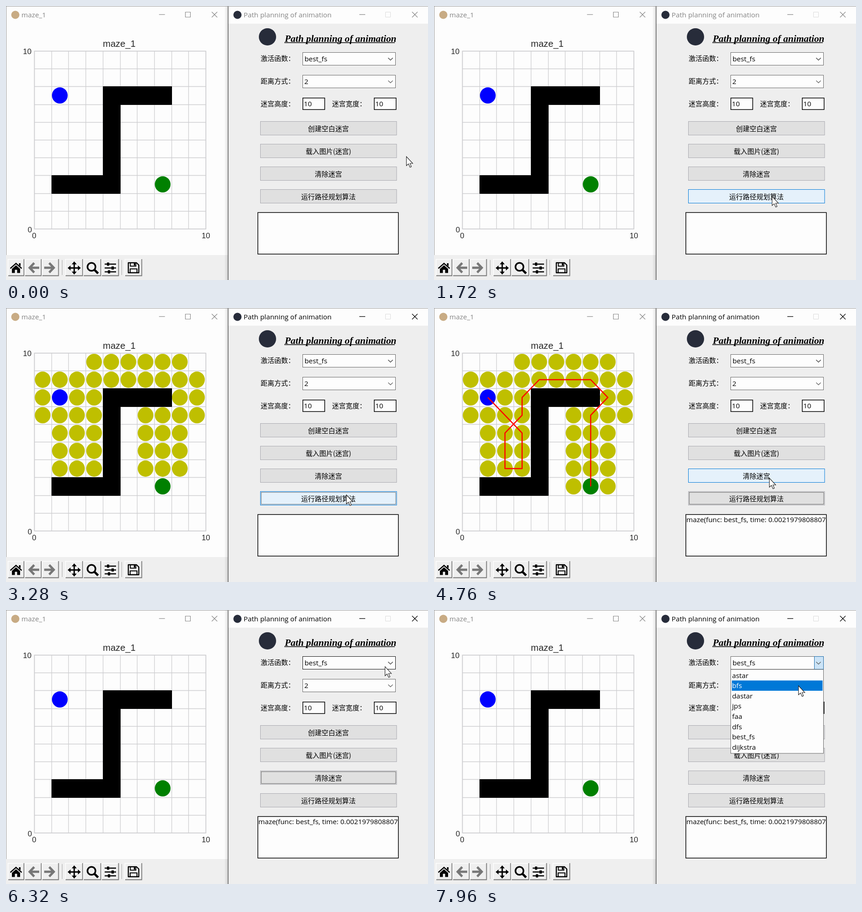
Animation of 928 by 604 pixels, one loop 8 s. Source, as an HTML page:

```html
<!DOCTYPE html>
<html lang="zh">
<head>
<meta charset="utf-8">
<title>Path planning</title>
<style>
html, body { margin: 0; width: 100%; height: 100%; overflow: hidden; background: #fdfdfd; }
svg { display: block; width: 100vw; height: 100vh; }
text { font: 15.3px "Open Sans", "Noto Sans", sans-serif; white-space: pre; }
.cjk { font: 15px "Noto Sans CJK SC", "Noto Sans CJK", sans-serif; }
.tick { font: 16.8px "Liberation Sans", sans-serif; fill: #262626; }
.plot-title { font: 20.2px "Liberation Sans", sans-serif; fill: #262626; }
.script { font: italic bold 21.4px "Liberation Serif", serif; }
.mid { text-anchor: middle; }
.end { text-anchor: end; }
.line { fill: none; }
.button { fill: #e0e0e0; stroke: #a9a9b0; }
.button.hover { fill: #e5f1fb; stroke: #0078d7; }
.focus { fill: none; stroke: #000; stroke-dasharray: 1 1; }
.combo { fill: #fdfdfd; stroke: #666; }
.combo.hover { stroke: #111; }
.entry { fill: #fdfdfd; stroke: #000; stroke-width: 1.5; }
</style>
</head>
<body>
<svg id="stage" viewBox="0 0 928 604" preserveAspectRatio="none"></svg>
<script>
const LOOP = 8000;
const RUN_CLICK = 1880, SEARCH_START = 1990, STEP = 70, RESULT = 3440;
const CLEAR_CLICK = 5200, LIST_OPEN = 6620;
const ROW_HEIGHT = 22.6, LIST_TOP = 132.8;

// Grid lines sit on whole pixels; disc centres do not.
const cellX = x => 62.5 + 37.7 * x;
const cellY = y => 491.5 - 39.2 * y;
const lineX = x => Math.floor(cellX(x)) + .5;
const lineY = y => Math.floor(cellY(y)) + .5;
const centreX = x => cellX(x + .5) - .7;
const centreY = y => cellY(y + .5) - .3;
const range = n => [...Array(n).keys()];

// ---- search: each visited node reveals its free neighbours
const route = [[1,7],[2,6],[3,5],[3,4],[3,3],[2,3],[2,4],[2,5],[3,6],[3,7],[4,8],
  [5,8],[6,8],[7,8],[8,7],[7,6],[7,5],[7,4],[7,3],[7,2]];
const isWall = (x, y) =>
  (y === 7 && x >= 4 && x <= 7) || (x === 4 && y >= 2 && y <= 7) || (y === 2 && x >= 1 && x <= 4);

function exploreCells() {
  const seen = new Set([route[0], route.at(-1)].map(String));
  const cells = [];
  route.slice(0, -1).forEach(([cx, cy], step) => {
    for (let x = cx - 1; x <= cx + 1; x++) for (let y = cy - 1; y <= cy + 1; y++) {
      const inside = x >= 0 && x < 10 && y >= 0 && y < 10;
      if (!inside || isWall(x, y) || seen.has(`${x},${y}`)) continue;
      seen.add(`${x},${y}`);
      cells.push({ x, y, time: SEARCH_START + (step + 1) * STEP });
    }
  });
  return cells;
}
const cells = exploreCells();

// ---- markup helpers
const rect = (x, y, w, h, attrs = '') => `<rect x="${x}" y="${y}" width="${w}" height="${h}" ${attrs}/>`;
const path = (d, attrs = '') => `<path d="${d}" ${attrs}/>`;
const circle = (x, y, r, attrs) => `<circle cx="${x}" cy="${y}" r="${r}" ${attrs}/>`;
const text = (x, y, str, cls = '', attrs = '') => `<text x="${x}" y="${y}" class="${cls}" ${attrs}>${str}</text>`;
const disc = (x, y, color, attrs = '') =>
  `<ellipse cx="${centreX(x)}" cy="${centreY(y)}" rx="17.3" ry="17.9" fill="${color}" ${attrs}/>`;
const minimise = x => path(`M${x} 18.8h13`);
const maximise = x => path(`M${x + .5} 13.5h11v11h-11z`);
const close = x => path(`M${x} 13l12 12m0 -12l-12 12`);
const chevron = y => path(`M840.5 ${y}l5 5l5 -5`, 'class="line" stroke="#555" stroke-width="1.2"');

function mazePlot() {
  const grid = range(11).map(i =>
    `M${lineX(i)} 99.5V491.5M62.5 ${lineY(i)}H439.5`).join('');
  const wall = `M${lineX(4)} ${lineY(8)}H${lineX(8)}V${lineY(7)}H${lineX(5)}V${lineY(2)}H${lineX(1)}V${lineY(3)}H${lineX(4)}z`;
  const track = 'M' + route.map(([x, y]) => `${centreX(x)} ${centreY(y)}`).join('L');
  return path(grid, 'class="line" stroke="#cdcdd0" stroke-width="1.3"')
    + path('M62.5 99.5H439.5V491.5H62.5z', 'class="line" stroke="#cccccf" stroke-width="1.6"')
    + path(wall, 'stroke="#000"')
    + cells.map(c => disc(c.x, c.y, '#bfbf00', 'class="cell"')).join('')
    + disc(1, 7, '#00f') + disc(7, 2, '#008000')
    + path(track, 'id="track" class="line" stroke="#f00" stroke-width="2.5" stroke-linejoin="round"')
    + text(249, 90, 'maze_1', 'plot-title mid')
    + text(56, 106, '10', 'tick end') + text(57, 499, '0', 'tick end')
    + text(62, 512, '0', 'tick mid') + text(439.5, 512, '10', 'tick mid');
}

function toolbar() {
  const raised = (x, w) =>
    rect(x, 558, w, 37, 'fill="#efefef"')
    + path(`M${x + .5} 595V558.5H${x + w}`, 'class="line" stroke="#fff" stroke-width="1.5"')
    + path(`M${x + 1} 594.5H${x + w - .5}V558`, 'class="line" stroke="#777" stroke-width="1.8"');
  const divider = x => path(`M${x} 560V593`, 'stroke="#aaa"');
  const arrow = (x, dir) => path(
    `M${x} 566.5l${-10 * dir} 10.5l${10 * dir} 10.5M${x - 9 * dir} 577h${20 * dir}`,
    'class="line" stroke="#777" stroke-width="5"');
  const home = path('M9.5 578.5L22 567.5L34.5 578.5', 'class="line" stroke="#000" stroke-width="2.6"')
    + path('M28.5 567h3.5v7l-3.5 -3z')
    + path('M13 579.5L22 571.5L31 579.5V588.5H24.5V581.5H19.5V588.5H13z');
  const pan = path('M150 567v21M139 577.5h22', 'stroke="#000" stroke-width="3"')
    + path('M150 563l5.5 6.5h-11zM150 592l5.5 -6.5h-11zM135.5 577.5l6.5 -5.5v11zM164.5 577.5l-6.5 -5.5v11z');
  const zoom = circle(188, 575, 8.8, 'class="line" stroke="#000" stroke-width="3.6"')
    + path('M194.5 581.5l8 8', 'stroke="#000" stroke-width="5"');
  const sliders = path('M217 569h25M217 577.5h25M217 586h25', 'stroke="#000" stroke-width="2.4"')
    + rect(222, 565.5, 5, 7) + rect(232, 574, 5, 7) + rect(224, 582.5, 5, 7);
  const save = path('M269 566h18l5 5v17h-23z', 'class="line" stroke="#000" stroke-width="2.4" stroke-linejoin="round"')
    + path('M273.5 566v7.5h12v-7.5M273 588v-8.5h15v8.5', 'class="line" stroke="#000" stroke-width="2"')
    + rect(281, 567, 3, 5);
  return rect(0, 549, 488, 55, 'fill="#efefef"')
    + raised(4, 36) + raised(41, 37) + raised(79, 37) + raised(130, 39)
    + raised(170, 39) + raised(210, 38) + raised(261, 38)
    + divider(123.5) + divider(254.5)
    + home + arrow(62, 1) + arrow(95, -1) + pan + zoom + sliders + save;
}

const buttons = ['创建空白迷宫', '载入图片(迷宫)', '清除迷宫', '运行路径规划算法']
  .map((label, i) => ({ label, y: 254.5 + 50 * i }));
const CLEAR = 2, RUN = 3;
const options = ['astar', 'bfs', 'dastar', 'jps', 'faa', 'dfs', 'best_fs', 'dijkstra'];

function controlPanel() {
  const labels = [[560, 120.5, '激活函数：'], [560, 171, '距离方式：'], [560, 221, '迷宫高度：'], [717, 221, '迷宫宽度：']];
  return rect(489, 39, 439, 565, 'fill="#eeeeee"')
    + circle(575, 68, 19, 'fill="#272c3a"')
    + text(613, 78.5, 'Path planning of animation', 'script')
    + path('M612 80.7H855', 'stroke="#000" stroke-width="1.4"')
    + labels.map(l => text(...l, 'cjk')).join('')
    + [102.5, 152.5].map(y => rect(652.5, y, 204, 28, 'class="combo"') + chevron(y + 12)).join('')
    + rect(836.5, 102.5, 20, 28, 'id="dropButton" fill="#cce4f7" stroke="#1a6aa8"')
    + chevron(114.5)
    + text(656.5, 122, 'best_fs') + text(656, 172, '2')
    + rect(652.8, 202.8, 48, 25.5, 'class="entry"') + text(655, 221, '10')
    + rect(809.8, 202.8, 48, 25.5, 'class="entry"') + text(812, 221, '10')
    + buttons.map(b => rect(559.5, b.y, 299.5, 30, 'class="button"')
      + rect(561.5, b.y + 2, 295.5, 26, 'class="focus"')
      + text(709, b.y + 21, b.label, 'cjk mid')).join('')
    + rect(553.8, 455.3, 309, 91.5, 'class="entry"')
    + `<clipPath id="resultClip">${rect(554, 456, 308.5, 90)}</clipPath>`
    + text(555, 472.3, 'maze(func: best_fs, time: 0.0021979808807', '', 'id="result" clip-path="url(#resultClip)"');
}

function dropList() {
  return '<g id="list">' + rect(652.5, 131, 204, 185, 'fill="#fdfdfd" stroke="#666"')
    + rect(655, 0, 199.5, ROW_HEIGHT, 'id="listMark" fill="#0078d7"')
    + options.map((o, i) => text(655.5, LIST_TOP + ROW_HEIGHT * i + 16.8, o, 'option')).join('')
    + '</g>';
}

// Soft shadow that the right window casts on the left one.
const windowShadow = '<linearGradient id="shade"><stop stop-opacity="0"/><stop offset="1" stop-opacity=".12"/></linearGradient>'
  + rect(480, 0, 8, 604, 'fill="url(#shade)"');

const stage = document.getElementById('stage');
stage.innerHTML =
  rect(0, 0, 928, 604, 'fill="#fdfdfd"')
  + circle(20.5, 19.5, 9, 'fill="#c8ab84"')
  + text(34, 25, 'maze_1', '', 'fill="#858585"')
  + `<g class="line" stroke="#8a8a8a" stroke-width="1.2">${minimise(336.5) + maximise(394) + close(452.5)}</g>`
  + mazePlot() + toolbar() + windowShadow
  + circle(509, 19.5, 9, 'fill="#272c3a"')
  + text(522.5, 25, 'Path planning of animation', '', 'id="caption"')
  + `<g id="controls" class="line" stroke-width="1.3">${minimise(777) + close(893)}</g>`
  + `<g class="line" stroke="#dcdcdc">${maximise(834)}</g>`
  + controlPanel()
  + path('M488.5 0V604', 'stroke="#555" stroke-width="1.4"')
  + path('M0 .5H928M.5 0V549', 'stroke="#999"')
  + dropList()
  + path('M0 0V20L4.5 16L8 23.5L11 22.2L7.8 15H14z', 'id="cursor" fill="#fff" stroke="#222" stroke-width="1.1"');

const $ = id => document.getElementById(id);
const all = sel => [...stage.querySelectorAll(sel)];
const cellNodes = all('.cell'), buttonNodes = all('.button'), focusNodes = all('.focus');
const optionNodes = all('.option'), comboNodes = all('.combo');
const show = (node, on) => node.setAttribute('visibility', on ? 'visible' : 'hidden');

// time, x, y of the pointer tip
const pointerKeys = [[0, 880, 332], [720, 735, 437], [950, 743, 421], [2320, 743, 419],
  [3280, 748, 412], [3700, 748, 412], [4500, 737, 378], [4760, 737, 375], [5300, 737, 375],
  [6150, 834, 127], [6320, 833, 125], [6560, 845, 118], [6800, 845, 118], [7500, 806, 162], [7960, 801, 167]];

function pointerAt(t) {
  const next = pointerKeys.findIndex(k => k[0] > t);
  if (next < 0) return pointerKeys.at(-1).slice(1);
  const [t0, x0, y0] = pointerKeys[next - 1], [t1, x1, y1] = pointerKeys[next];
  const u = (t - t0) / (t1 - t0), ease = u * u * (3 - 2 * u);
  return [x0 + (x1 - x0) * ease, y0 + (y1 - y0) * ease];
}

function draw(t) {
  const [px, py] = pointerAt(t);
  const within = (x, y, w, h) => px >= x && px <= x + w && py >= y && py <= y + h;
  const active = t >= RUN_CLICK, cleared = t >= CLEAR_CLICK, open = t >= LIST_OPEN;

  $('cursor').setAttribute('transform', `translate(${px + .5} ${py})`);
  $('caption').setAttribute('fill', active ? '#000' : '#858585');
  $('controls').setAttribute('stroke', active ? '#000' : '#8a8a8a');

  cells.forEach((c, i) => show(cellNodes[i], t >= c.time && !cleared));
  show($('track'), t >= RESULT && !cleared);
  show($('result'), t >= RESULT);

  const focused = open || !active ? -1 : cleared ? CLEAR : RUN;
  buttons.forEach((b, i) => {
    buttonNodes[i].classList.toggle('hover', !open && within(559, b.y, 300, 30));
    show(focusNodes[i], i === focused);
  });
  comboNodes.forEach((node, i) =>
    node.classList.toggle('hover', !open && within(652, 102 + 50 * i, 205, 29)));

  show($('dropButton'), open);
  show($('list'), open);
  const row = Math.floor((py - LIST_TOP) / ROW_HEIGHT);
  const marked = row >= 0 ? row : options.indexOf('best_fs');
  $('listMark').setAttribute('y', LIST_TOP + ROW_HEIGHT * marked);
  optionNodes.forEach((node, i) => node.setAttribute('fill', i === marked ? '#fff' : '#000'));
}

const start = performance.now();
function frame() {
  draw((performance.now() - start) % LOOP);
  requestAnimationFrame(frame);
}
frame();
</script>
</body>
</html>
```
